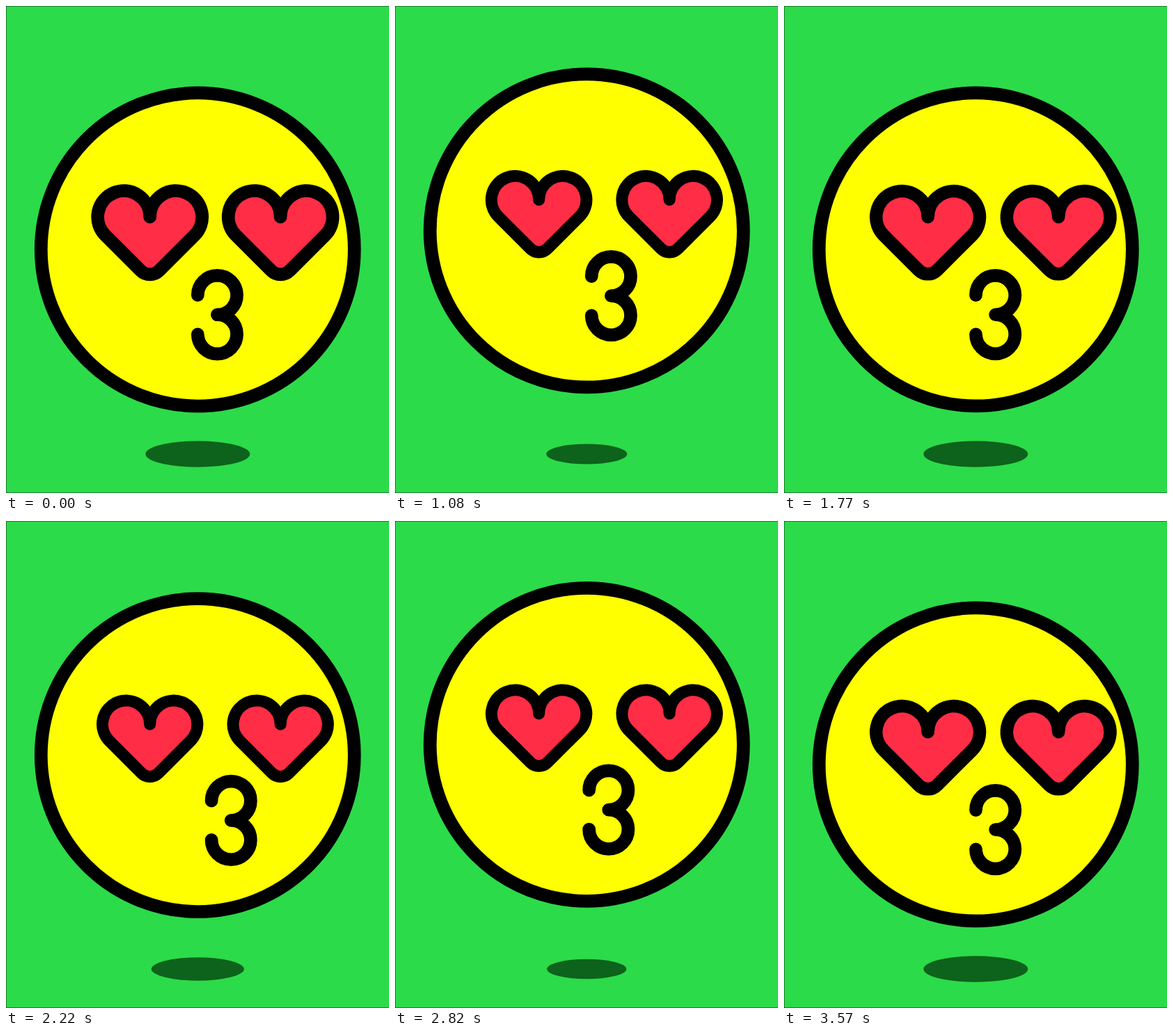
An HTML page for the animation above (3.6 s loop, 550 by 700 pixels).

```html
<!DOCTYPE html>
<html lang="en">
<head>
<meta charset="utf-8">
<title>Kissing face</title>
<style>
  html, body { margin: 0; height: 100%; overflow: hidden; background: #000; }
  svg { display: block; }
</style>
</head>
<body>
<svg width="550" height="700" viewBox="0 0 550 700">
  <defs>
    <path id="heart" d="M0 0A2 2 0 1 0-3.414 1.414L-.707 4.121A1 1 0 0 0 .707 4.121L3.414 1.414A2 2 0 1 0 0 0Z"
      transform="translate(0 -1.5)"/>
  </defs>
  <rect x=".4" y=".4" width="550" height="699.2" fill="#2cdb49"/>
  <ellipse id="shadow" rx="75" ry="18.75" fill="#0d621c"/>
  <g id="face" stroke="#000" stroke-linecap="round" stroke-linejoin="round">
    <circle r="12" fill="#ff0"/>
    <g fill="#ff2d46">
      <use class="eye" href="#heart"/>
      <use class="eye" href="#heart"/>
    </g>
    <path id="mouth" fill="none" d="M-1.5-1.5A1.5 1.5 0 1 1 0 0A1.5 1.5 0 1 1-1.5 1.5"/>
  </g>
</svg>
<script>
  const UNIT = 18.75, CENTER_X = 275.3;
  const EYE_X = [-3.66, 6.34];
  const [shadow, face, mouth] = ['shadow', 'face', 'mouth'].map(id => document.getElementById(id));
  const eyes = document.querySelectorAll('.eye');

  // Smooth 0 -> 1 -> 0 over one period
  const wave = (t, period) => (1 - Math.cos(2 * Math.PI * t / period)) / 2;
  const place = (el, x, y, scale = 1) =>
    el.setAttribute('transform', `translate(${x} ${y}) scale(${scale})`);

  function draw() {
    const t = performance.now() % 3600;
    const lift = wave(t, 1800);
    place(face, CENTER_X, 350 - 30 * lift, UNIT);
    place(shadow, CENTER_X, 644, 1 - 0.25 * lift);
    place(mouth, 1.5 + 20 / UNIT * wave(t, 900), 5);
    eyes.forEach((eye, i) => place(eye, EYE_X[i], -1, 1 - 0.1 * wave(t, 300)));
    requestAnimationFrame(draw);
  }
  draw();
</script>
</body>
</html>
```
